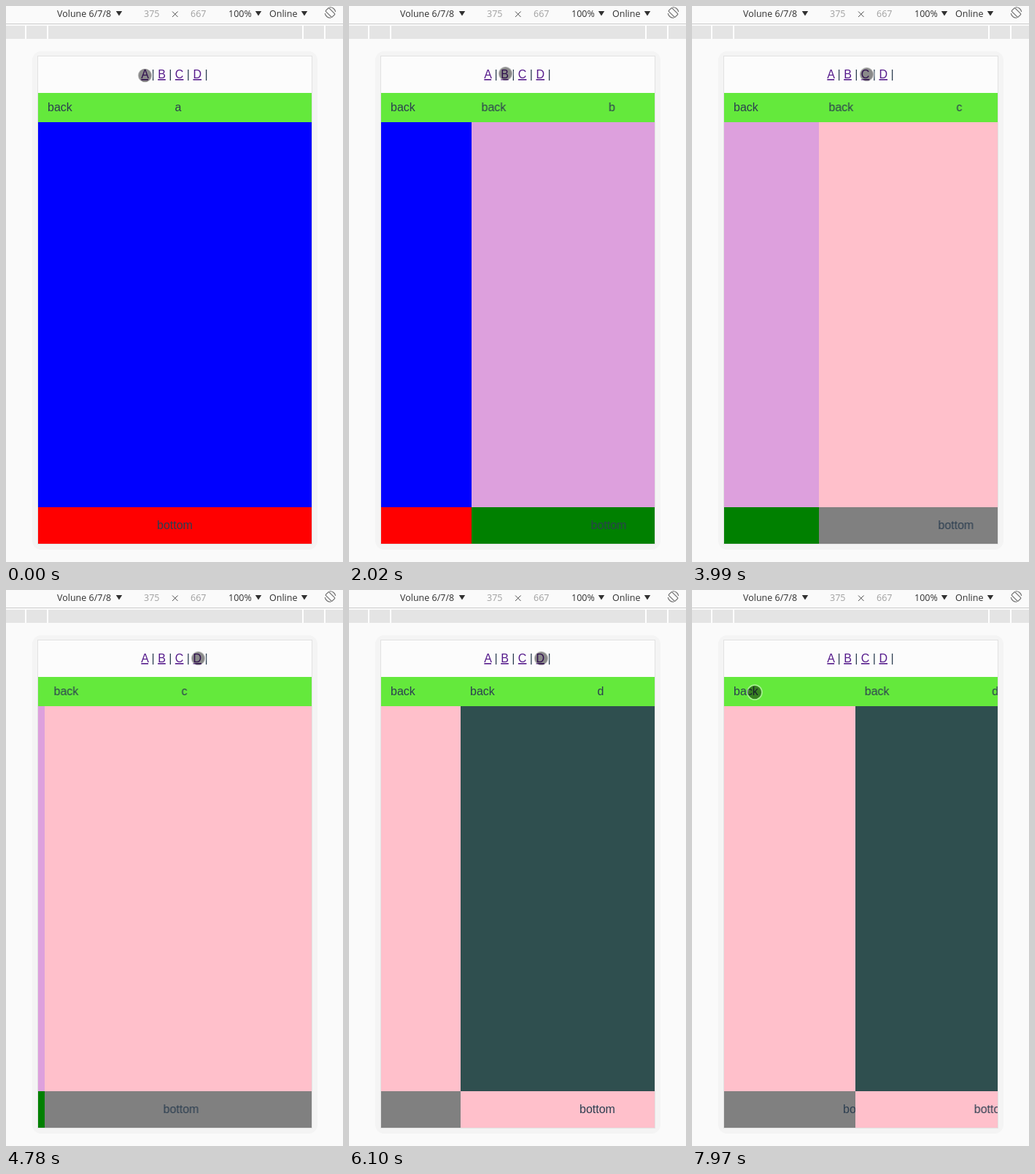
Write an HTML page that moves like this. It is 462x761 px and loops after 8000 ms.

```html
<!DOCTYPE html>
<html lang="en">
<head>
<meta charset="utf-8">
<title>Page slide transitions</title>
<style>
html, body { margin: 0; width: 100%; height: 100%; overflow: hidden; background: #fafafa; }
svg { display: block; }
text { font: 16px "Liberation Sans", Arial, sans-serif; fill: #2c3e50; }
.bar text { font: 12.5px "Open Sans", "Noto Sans", sans-serif; fill: #303030; }
.bar .dim { fill: #a0a0a0; }
.link { fill: #551a8b; text-decoration: underline; }
.mid { text-anchor: middle; }

.page, .cursor, .link { animation: 8s linear infinite; }
.b { animation-name: slide-b; }
.c { animation-name: slide-c; }
.d { animation-name: slide-d; }
.cursor { animation-name: point; }
.tap-b { animation-name: tap-b; }
.tap-c { animation-name: tap-c; }
.tap-d { animation-name: tap-d; }

@keyframes slide-b {
  0% { transform: translateX(375px); }
  16.46% { transform: translateX(375px); animation-timing-function: ease; }
  39.03%, 100% { transform: translateX(0); }
}
@keyframes slide-c {
  0% { transform: translateX(375px); }
  41.11% { transform: translateX(375px); animation-timing-function: ease; }
  64.24%, 100% { transform: translateX(0); }
}
/* D slides in, then starts back out with a short stall */
@keyframes slide-d {
  0% { transform: translateX(375px); }
  65.83% { transform: translateX(375px); animation-timing-function: ease; }
  90.7% { transform: translateX(0); }
  92.15% { transform: translateX(0); animation-timing-function: cubic-bezier(.408, .111, .684, .51); }
  96.875%, 97.875% { transform: translateX(110px); }
  100% { transform: translateX(194px); }
}
@keyframes point {
  0% { transform: translate(190.5px, 95px); }
  4.625% { transform: translate(190.5px, 95px); animation-timing-function: ease-in-out; }
  12.625%, 33.5% { transform: translate(214.5px, 92.5px); animation-timing-function: ease-in-out; }
  39%, 53.5% { transform: translate(239.5px, 93.5px); animation-timing-function: ease-in-out; }
  59.3% { transform: translate(263.5px, 93.5px); }
  80.5% { transform: translate(263.5px, 93.5px); animation-timing-function: ease-in; }
  86.5% { transform: translate(135px, 116px); }
  87.5% { transform: translate(111.5px, 127.5px); animation-timing-function: ease-out; }
  91%, 100% { transform: translate(86px, 140px); }
}
@keyframes tap-b {
  0%, 16.49% { fill: #551a8b; }
  16.5%, 18.1% { fill: #e00; }
  18.11%, 100% { fill: #551a8b; }
}
@keyframes tap-c {
  0%, 41.11% { fill: #551a8b; }
  41.12%, 42.75% { fill: #e00; }
  42.76%, 100% { fill: #551a8b; }
}
@keyframes tap-d {
  0%, 66.2% { fill: #551a8b; }
  66.21%, 67.8% { fill: #e00; }
  67.81%, 100% { fill: #551a8b; }
}
</style>
</head>
<body>
<svg width="462" height="761" viewBox="0 0 462 761">
  <defs>
    <clipPath id="screen"><rect x="44" y="69" width="375" height="667"/></clipPath>
    <path id="arrow" d="M-4.2 0H4.2L0 6.5Z" fill="#303030"/>
    <g id="frame">
      <rect x="44" y="119" width="375" height="40" fill="#64e93c"/>
      <text x="57" y="144">back</text>
      <text class="mid" x="231.5" y="716">bottom</text>
    </g>
  </defs>

  <rect width="462" height="761" fill="#fafafa"/>

  <g class="bar">
    <rect y="24" width="462" height="1" fill="#ccc"/>
    <text x="70" y="15">Volune 6/7/8</text>
    <text class="dim" x="189" y="15">375</text>
    <path d="M228 7.5l7.5 7.5m0-7.5l-7.5 7.5" stroke="#505050" fill="none"/>
    <text class="dim" x="253" y="15">667</text>
    <text x="305" y="15">100%</text>
    <text x="361" y="15">Online</text>
    <use href="#arrow" x="155" y="7"/>
    <use href="#arrow" x="346" y="7"/>
    <use href="#arrow" x="409" y="7"/>
    <g transform="translate(444.5 9)" fill="none" stroke="#6e6e6e" stroke-width="1.2">
      <rect x="-3.2" y="-6.2" width="6.4" height="12.4" rx="1" transform="rotate(-45)"/>
      <path d="M-1 -7.2A7.3 7.3 0 0 1 7.2 -1M1 7.2A7.3 7.3 0 0 1 -7.2 1"/>
    </g>
    <rect y="27" width="462" height="18" fill="#e4e4e4"/>
    <path d="M27 27v18M57 27v18M407 27v18M437 27v18" stroke="#fff" stroke-width="2"/>
  </g>

  <rect x="36" y="62" width="391" height="682" rx="12" fill="#f4f4f4"/>
  <rect x="43.5" y="68.5" width="376" height="668" fill="#fcfcfc" stroke="#e2e2e2"/>

  <text x="185.3" y="99"><tspan class="link">A</tspan> | <tspan class="link tap-b">B</tspan> | <tspan class="link tap-c">C</tspan> | <tspan class="link tap-d">D</tspan> |</text>

  <g clip-path="url(#screen)">
    <g>
      <rect x="44" y="159" width="375" height="527" fill="#00f"/>
      <rect x="44" y="686" width="375" height="50" fill="#f00"/>
      <use href="#frame"/>
      <text class="mid" x="236" y="144">a</text>
    </g>
    <g class="page b">
      <rect x="44" y="159" width="375" height="527" fill="plum"/>
      <rect x="44" y="686" width="375" height="50" fill="green"/>
      <use href="#frame"/>
      <text class="mid" x="236" y="144">b</text>
    </g>
    <g class="page c">
      <rect x="44" y="159" width="375" height="527" fill="pink"/>
      <rect x="44" y="686" width="375" height="50" fill="gray"/>
      <use href="#frame"/>
      <text class="mid" x="236" y="144">c</text>
    </g>
    <g class="page d">
      <rect x="44" y="159" width="375" height="527" fill="darkslategray"/>
      <rect x="44" y="686" width="375" height="50" fill="pink"/>
      <use href="#frame"/>
      <text class="mid" x="236" y="144">d</text>
    </g>
  </g>

  <g class="cursor">
    <circle r="9.3" fill="#000" fill-opacity=".45"/>
    <circle r="10" fill="none" stroke="#fff" stroke-opacity=".45" stroke-width="1.6"/>
  </g>
</svg>
</body>
</html>
```
